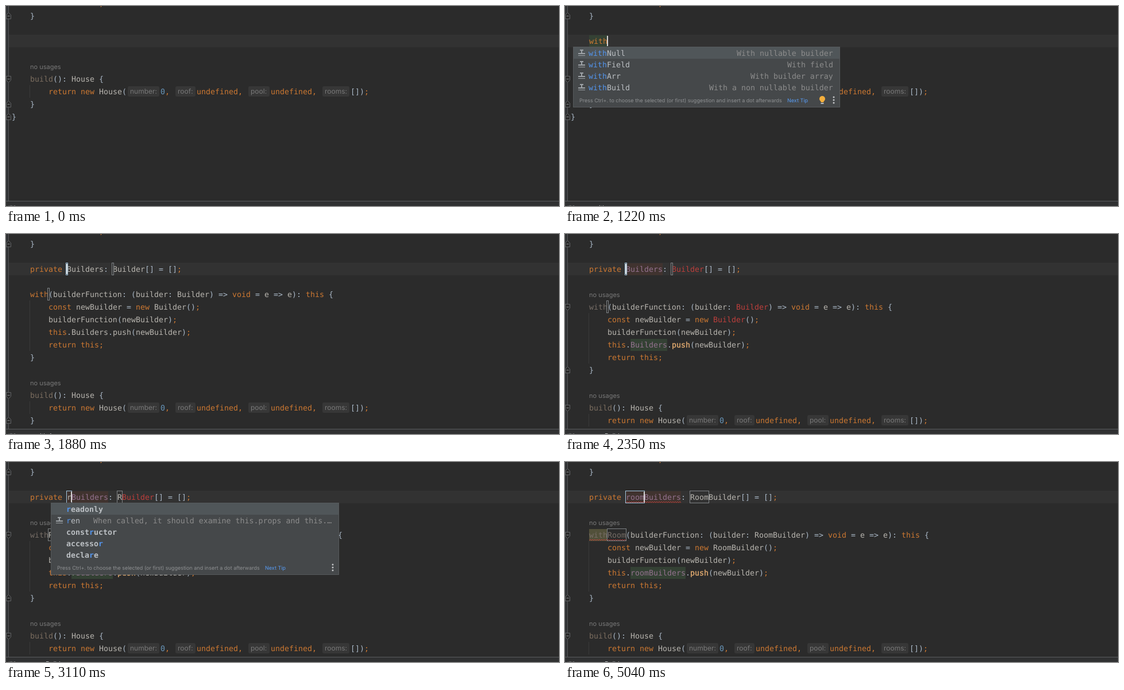
An HTML page for the animation above (5310 ms loop, 963x349 px).

```html
<!DOCTYPE html>
<html lang="en">
<head>
<meta charset="utf-8">
<title>Live template</title>
<style>
html, body { margin: 0; width: 100%; height: 100%; overflow: hidden; background: #2b2b2b; }
svg { display: block; width: 963px; height: 349px; }
text { white-space: pre; text-rendering: geometricPrecision; }
.code { font: 13.288px "DejaVu Sans Mono", monospace; }
.bold { font-weight: 700; }
.ui { font-family: Inter, "Open Sans", sans-serif; }
</style>
</head>
<body>
<svg id="stage" viewBox="0 0 963 349"></svg>
<script>
const LOOP = 5310, CW = 8, LEFT = 42;
const C = {
  plain: '#b8b5af', punct: '#a9b7c6', key: '#cc7832', num: '#6897bb', dim: '#766d66',
  field: '#94728f', error: '#bc3f3c', call: '#e8af72', hint: '#787878', match: '#5394ec'
};
const KEYWORDS = /^(private|const|new|return|this|void|undefined|[;,])$/;

const stage = document.getElementById('stage');
const col = n => LEFT + n * CW;
const row = n => 50 + n * 22;
const at = (t, list) => list.filter(e => t >= e[0]).pop()[1];

const rect = (x, y, w, h, fill, more = '') =>
  `<rect x="${x}" y="${y}" width="${w}" height="${h}" fill="${fill}" ${more}/>`;
const path = (d, stroke, fill = 'none', w = 1) =>
  `<path d="${d}" stroke="${stroke}" fill="${fill}" stroke-width="${w}"/>`;
const mono = (x, y, s, fill, cls = '', more = '') =>
  `<text class="code ${cls}" x="${x}" y="${y}" fill="${fill}" ${more}>${s}</text>`;
const ui = (x, y, size, s, fill) =>
  `<text class="ui" x="${x}" y="${y}" font-size="${size}" fill="${fill}">${s}</text>`;

function colorOf(word) {
  if (KEYWORDS.test(word)) return C.key;
  if (/^\d/.test(word)) return C.num;
  return /\w/.test(word) ? C.plain : C.punct;
}

// Parts are plain strings (coloured by token) or [string, colour].
function code(r, x, ...parts) {
  let out = '';
  for (const part of parts) {
    const [s, color] = Array.isArray(part) ? part : [part];
    for (const m of s.matchAll(/\w+|[;,]|[^\w\s;,]+/g)) {
      const fill = color || colorOf(m[0]);
      const more = fill === C.call ? `stroke="${fill}" stroke-width=".35"` : '';
      out += mono(x + m.index * CW, row(r) + 16, m[0], fill, '', more);
    }
    x += s.length * CW;
  }
  return out;
}

function fold(r, dir) {
  const y = row(r) + 11.5, p = n => y + n * dir;
  return path(`M.5 ${p(-5)}H8.5V${p(2)}L4.5 ${p(6)}L.5 ${p(2)}Z`, '#606264', '#2b2b2b') +
    path(`M2.5 ${y}H6.5`, '#85888a');
}

const guide = (r, n) => path(`M41.5 ${row(r)}V${row(r + n)}`, '#393939');
const usages = r => ui(LEFT, row(r) + 16, 11, 'no usages', C.hint);
const mark = (r, c, n, fill) => rect(col(c), row(r) + 1, n * CW, 21, fill);
const caret = x => rect(x - 1, 52, 2, 18, '#d6d6d6');

function slot(r, c, n, stroke) {
  const pad = n ? .5 : 1.5;
  return rect(col(c) - pad, row(r) + .5, n * CW + 2 * pad, 21, 'none', `stroke="${stroke}"`);
}

function wave(r, c, n) {
  const y = row(r) + 20;
  let d = `M${col(c)} ${y + 1}`;
  for (let i = 0; i < n * 2; i++) d += 'l2 -2l2 2';
  return path(d, C.error, 'none', .9);
}

function hint(r, from, to, label) {
  return rect(from + 2, row(r) + 2, to - from - 4, 18, '#373737', 'rx="3"') +
    ui(from + 6, row(r) + 15, 12, label, C.hint);
}

function buildMethod(r) {
  return usages(r) + fold(r + 1, 1) + fold(r + 3, -1) + guide(r + 2, 1) +
    code(r + 1, LEFT, ['build', '#7b6d5f'], '(): House {') +
    code(r + 2, col(4), 'return new House(') +
    hint(r + 2, 210, 269, 'number:') + code(r + 2, 269, '0,') +
    hint(r + 2, 293, 332, 'roof:') + code(r + 2, 332, 'undefined,') +
    hint(r + 2, 420, 461, 'pool:') + code(r + 2, 461, 'undefined,') +
    hint(r + 2, 549, 600, 'rooms:') + code(r + 2, 600, '[]);') +
    code(r + 3, LEFT, '}') +
    code(r + 4, 10, '}') + fold(r + 4, -1);
}

const stamp = (x, y) =>
  path(`M${x - 3} ${y - 5}H${x + 3}M${x} ${y - 5}V${y + 1}M${x - 6} ${y + 1}H${x + 6}`, '#9da2a6', 'none', 2) +
  path(`M${x - 6} ${y + 4.5}H${x + 6}`, '#9da2a6');

// Items: {name, hit: [start, length], tail, bold, icon}
function popup(x, w, nameX, items, bulb) {
  const h = items.length * 20 + 26, foot = 72 + items.length * 20, right = x + w;
  let out = rect(x + .5, 71.5, w - 1, h - 1, '#45484a', 'stroke="#56595b"') +
    rect(x + 1, 72, w - 2, 20, '#505659');
  items.forEach((it, i) => {
    const y = 87 + i * 20, [a, n] = it.hit, cls = it.bold ? 'bold' : '';
    const piece = (from, to, fill) => from < to ?
      mono(nameX + from * CW, y, it.name.slice(from, to), fill, cls) : '';
    out += piece(0, a, '#bbbfc3') + piece(a, a + n, C.match) + piece(a + n, it.name.length, '#bbbfc3');
    if (it.icon) out += stamp(nameX - 12, y - 5);
    if (it.tail) out += mono(right - 12 - it.tail.length * CW, y, it.tail, '#8c8c8c');
  });
  const tx = x + 11, cy = foot + 12;
  out += ui(tx, cy + 4, 9, 'Press Ctrl+. to choose the selected (or first) suggestion and insert a dot afterwards', '#8f9193') +
    ui(tx + 362, cy + 4, 9, 'Next Tip', '#589df6');
  if (bulb) {
    const bx = right - 31;
    out += `<circle cx="${bx}" cy="${cy - 2}" r="5" fill="#f4af3d"/>` +
      rect(bx - 2.5, cy + 1, 5, 3, '#f4af3d') + rect(bx - 2.5, cy + 5, 5, 2, '#b9bcbe');
  }
  for (const d of [-5, 0, 5]) out += `<circle cx="${right - 11}" cy="${cy + d}" r="1.5" fill="#c4c6c8"/>`;
  return out;
}

const TEMPLATES = [
  ['withNull', 'With nullable builder'],
  ['withField', 'With field'],
  ['withArr', 'With builder array'],
  ['withBuild', 'With a non nullable builder']
];
const WORDS = ['readonly', 'ren', 'constructor', 'accessor', 'declare'];

function templatePopup(query) {
  let list = TEMPLATES.filter(e => e[0].startsWith(query));
  if (query.length < 3) list = list.sort ? [...list].sort() : list;
  return popup(14, 465, 41,
    list.map(([name, tail]) => ({ name, tail, hit: [0, query.length], icon: true })), true);
}

function wordPopup(name) {
  const words = name === 'r' ? WORDS : ['readonly', 'constructor'];
  return popup(78, 502, 105, words.map(w => ({
    name: w, hit: [w.indexOf('r'), 1], bold: w !== 'ren', icon: w === 'ren',
    tail: w === 'ren' ? 'When called, it should examine this.props and this.…' : ''
  })), false);
}

function typing(t) {
  const word = at(t, [[0, ''], [480, 'w'], [680, 'wi'], [880, 'wit'], [1150, 'with'], [1350, 'withA']]);
  const query = at(t, [[0, ''], [610, 'w'], [680, 'wi'], [950, 'wit'], [1220, 'with'], [1480, 'withA']]);
  const isKey = word === 'with';
  return (isKey && t >= 1220 ? mark(0, 0, 4, '#344134') : '') +
    code(0, LEFT, [word, isKey ? C.key : C.plain]) + buildMethod(2) +
    (word ? caret(col(word.length)) : '') + (query ? templatePopup(query) : '');
}

function expanded(t) {
  const name = at(t, [[0, ''], [2970, 'r'], [3180, 'ro'], [3310, 'roo'], [3520, 'room']]);
  const n = name.length, cap = name.charAt(0).toUpperCase() + name.slice(1);
  const shifted = t >= 2140, marked = t >= 2280, resolved = t >= 3720, warned = t >= 3850;
  const r = shifted ? 3 : 2;
  const type = t >= 2210 && !resolved ? C.error : C.plain;
  const field = marked ? C.field : C.plain;
  const typed = resolved ? C.field : C.plain;
  const active = '#a3c7e0', idle = '#7f8386';

  let out = '';
  if (marked) out += mark(0, 8, n + 8, '#40332f') + mark(r + 3, 9, n + 8, '#344134');
  if (warned) out += mark(r, 0, 4, '#52503a');
  out += guide(r + 1, 4) +
    code(0, LEFT, 'private ', [name, typed], ['Builders', field], ': ', [cap, C.plain], ['Builder', type], '[] = [];') +
    code(r, LEFT, ['with', shifted ? C.dim : t < 1950 ? C.key : C.plain], [cap, warned ? C.dim : C.plain],
      '(builderFunction: (builder: ', [cap, C.plain], ['Builder', type], ') => void = e => e): this {') +
    code(r + 1, col(4), 'const newBuilder = new ', [cap, C.plain], ['Builder', type], '();') +
    code(r + 2, col(4), 'builderFunction(newBuilder);') +
    code(r + 3, col(4), 'this.', [name, typed], ['Builders', field], '.',
      ['push', t >= 2350 ? C.call : C.plain], '(newBuilder);') +
    code(r + 4, col(4), 'return this;') +
    code(r + 5, LEFT, '}');
  if (shifted) out += usages(2) + fold(r, 1) + fold(r + 5, -1);
  out += buildMethod(r + 7);
  if (warned) out += wave(0, 8, n + 8) + wave(r, 0, n + 4);
  out += slot(0, 18 + n, n, idle) + slot(r, 4, n, idle) + slot(0, 8, n, active);
  if (t < 4510 || t >= 5040) out += caret(col(8 + n));
  if (t >= 3110 && t < 3310) out += wordPopup(name);
  return out;
}

// Only the tops of the tallest letters show above the lower edge.
function crumbs(t) {
  const item = (x, s) => ui(x, 356, 11, s, '#c3c5c6');
  let out = rect(0, 340, 963, 1, '#5a5c5e') + rect(0, 341, 963, 8, '#303132') + item(4, 'title');
  if (t >= 2350) out += item(69, 'Builders');
  else if (t >= 1220) out += item(50, 'with') + (t >= 1680 ? item(74, 'A') : '');
  return out;
}

function scene(t) {
  return rect(0, 0, 963, 349, '#2b2b2b') + rect(0, 0, 4, 340, '#313335') +
    rect(5, 50, 958, 22, '#323232') + path('M4.5 0V340', '#555759') +
    code(-3, col(15), ';') + code(-2, LEFT, '}') + fold(-2, -1) +
    (t < 1880 ? typing(t) : expanded(t)) + crumbs(t);
}

let shown = '';
function frame() {
  const html = scene(performance.now() % LOOP);
  if (html !== shown) stage.innerHTML = shown = html;
  requestAnimationFrame(frame);
}
frame();
</script>
</body>
</html>
```
